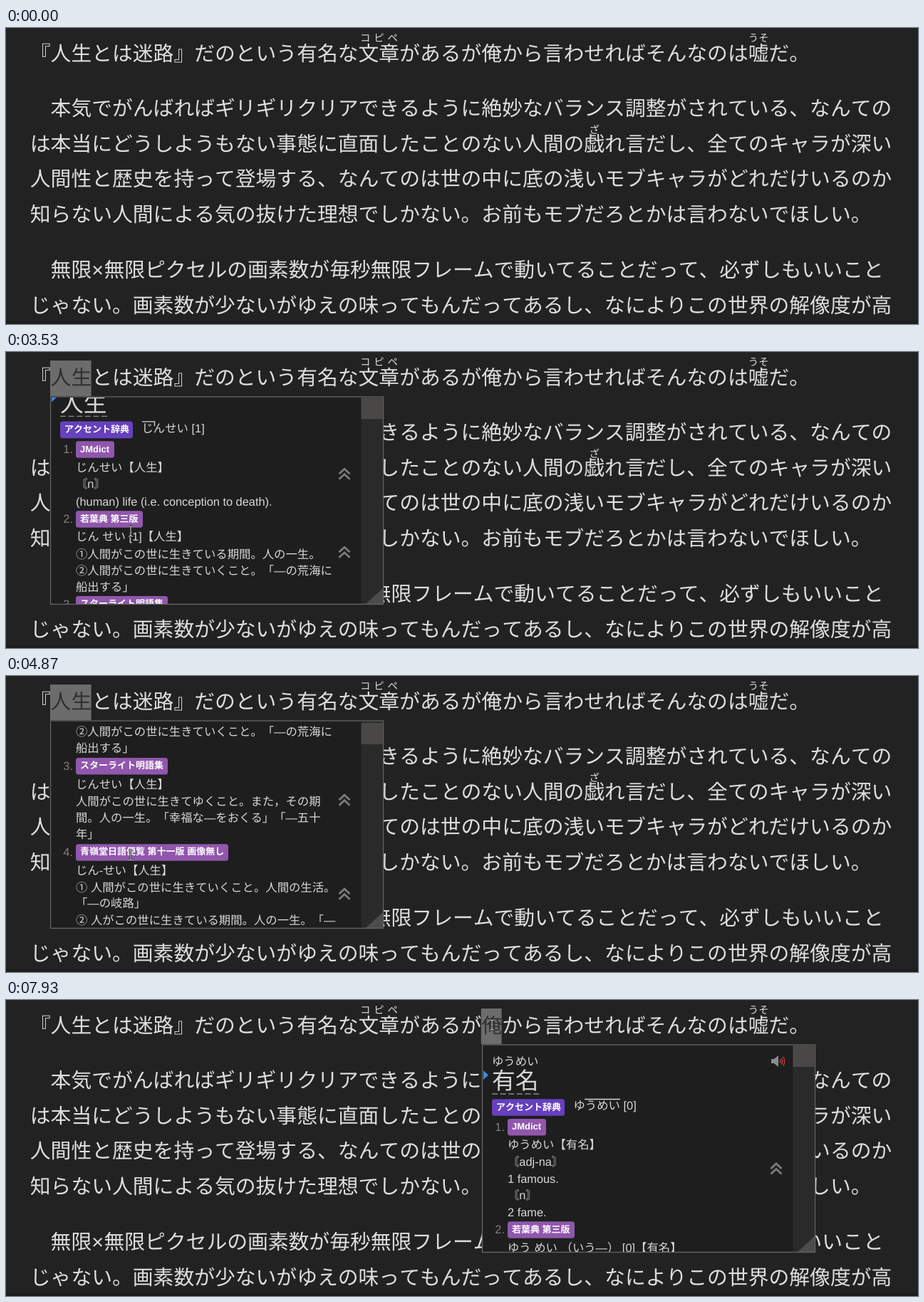
An HTML page for the animation above (8 s loop, 1280 by 416 pixels).

```html
<!DOCTYPE html>
<html lang="ja">
<head>
<meta charset="utf-8">
<title>Pop-up dictionary</title>
<style>
html, body { margin: 0; width: 100%; height: 100%; overflow: hidden; background: #222; }
svg { display: block; width: 1280px; height: 416px; }
text {
  white-space: pre;
  text-spacing-trim: space-all;
  text-rendering: geometricPrecision;
  font-kerning: none;
  font-feature-settings: "kern" 0, "palt" 0, "chws" 0;
}
.page { font-family: "Noto Sans CJK JP", "Noto Sans CJK", sans-serif; fill: #dedede; }
.dict { font-family: "Liberation Sans", "Noto Sans CJK JP", "Noto Sans CJK", sans-serif; fill: #d8d8d8; }
.dict .num { fill: #808080; }
.dict .tag { fill: #fff; font-weight: bold; }
.mark { fill: #303030; }
</style>
</head>
<body>
<svg id="stage" viewBox="0 0 1280 416">
  <defs><clipPath id="inner"><rect x="63" y="64" width="435.5" height="290"/></clipPath></defs>
</svg>
<script>
const stage = document.getElementById('stage');
const EM = 28.8, LEFT = 33.8, SMALL = 16.38;

function el(parent, tag, attrs = {}) {
  const node = document.createElementNS('http://www.w3.org/2000/svg', tag);
  for (const key in attrs) node.setAttribute(key, attrs[key]);
  parent.appendChild(node);
  return node;
}

// y is the middle of the ideographic box
function write(parent, x, y, size, str, attrs = {}) {
  const node = el(parent, 'text', { x, y: y + size * 0.38, 'font-size': size, ...attrs });
  node.textContent = str;
  return node;
}

// ---- page ----
const page = el(stage, 'g', { class: 'page' });
el(page, 'rect', { y: 412, width: 1280, height: 4, fill: '#1d1d1d' });
[
  [34.7, '『人生とは迷路』だのという有名な文章があるが俺から言わせればそんなのは嘘だ。'],
  [112, '　本気でがんばればギリギリクリアできるように絶妙なバランス調整がされている、なんての'],
  [162, 'は本当にどうしようもない事態に直面したことのない人間の戯れ言だし、全てのキャラが深い'],
  [211.5, '人間性と歴史を持って登場する、なんてのは世の中に底の浅いモブキャラがどれだけいるのか'],
  [261.3, '知らない人間による気の抜けた理想でしかない。お前もモブだろとかは言わないでほしい。'],
  [339, '　無限'],
  [389, 'じゃない。画素数が少ないがゆえの味ってもんだってあるし、なによりこの世界の解像度が高']
].forEach(([y, str]) => write(page, LEFT, y, EM, str));
write(page, LEFT + 3 * EM, 339, EM, '×', { style: 'font-family:"Liberation Sans",sans-serif' });
write(page, 137.4, 339, EM, '無限ピクセルの画素数が毎秒無限フレームで動いてることだって、必ずしもいいこと');

const ruby = (col, shift, y, str, gap = 0) =>
  write(page, LEFT + col * EM + shift, y, 14.4, str, { 'letter-spacing': gap });
ruby(16, 2.4, 14, 'コピペ', 4.8);
ruby(35, 0, 14, 'うそ');
ruby(27, 7.2, 143, 'ざ');

const marks = [[1, '人生'], [13, '有名'], [22, '俺']].map(([col, word]) => {
  const g = el(stage, 'g', { class: 'page' }), x = LEFT + col * EM;
  el(g, 'rect', { x: x - 0.6, y: 12, width: word.length * EM, height: 50, fill: '#6c6c6c' });
  write(g, x, 34.7, EM, word, { class: 'mark' });
  return g;
});

// ---- popup ----
const popup = el(stage, 'g', { class: 'dict' });
el(popup, 'rect', { x: 62.5, y: 63, width: 467, height: 291.5, fill: '#1e1e1e' });
const view = el(popup, 'g', { 'clip-path': 'url(#inner)' });
el(popup, 'rect', { x: 498.5, y: 64, width: 30, height: 290, fill: '#2a2a2a' });
const thumb = el(popup, 'rect', { x: 498.5, y: 64, width: 30, height: 30, fill: '#4a4846' });
el(popup, 'path', { d: 'M529 332V354H505Z', fill: '#4c4c4c' });
el(popup, 'rect', { x: 62.5, y: 63, width: 467, height: 291.5, fill: 'none', stroke: '#646464', 'stroke-width': 1.3 });

function tag(g, x, y, width, str, fill) {
  el(g, 'rect', { x, y: y - 11.8, width, height: 23.6, rx: 3.5, fill });
  write(g, x + 6, y - 1.4, 13, str, { class: 'tag' });
}

function entry({ kana, word, accent, pitch, tags, lines, arrows }) {
  const g = el(view, 'g');
  write(g, 76, 86, SMALL, kana);
  write(g, 76, 113, SMALL * 2, word);
  el(g, 'path', { d: 'M76 132H142', stroke: '#8a8a8a', 'stroke-width': 1.4, 'stroke-dasharray': '8 3.6' });
  el(g, 'path', { d: 'M64 99L71 105.5L64 112Z', fill: '#3f8ae0' });
  el(g, 'path', { d: 'M468 83H472L478 78V94L472 89H468Z', fill: '#8c8c8c' });
  el(g, 'path', { d: 'M480 83.5Q482 86 480 88.5M482.3 81.5Q485 86 482.3 90.5M484.8 79.5Q488.5 86 484.8 92.5',
    fill: 'none', stroke: '#c93a3a', 'stroke-width': 1.4 });
  tag(g, 76, 151, 102, 'アクセント辞典', '#6640be');
  write(g, 190.5, 148, SMALL, kana + accent);
  el(g, 'path', { d: pitch, fill: 'none', stroke: '#d8d8d8', 'stroke-width': 1.4 });
  tags.forEach(([y, width, str], i) => {
    write(g, 94, y - 1, SMALL, i + 1 + '.', { class: 'num', 'text-anchor': 'end' });
    tag(g, 98, y, width, str, '#9057ad');
  });
  lines.forEach(([y, str]) => write(g, 98, y, SMALL, str));
  arrows.forEach(y => el(g, 'path', {
    d: `M467.5 ${y}l7.5 -7l7.5 7m-15 7.5l7.5 -7l7.5 7`,
    fill: 'none', stroke: '#7c7c7c', 'stroke-width': 2.8
  }));
  return g;
}

const life = entry({
  kana: 'じんせい', word: '人生', accent: ' [1]', pitch: 'M191 139.5H208.5V146',
  tags: [
    [178.7, 54, 'JMdict'],
    [276.7, 94, '若葉典 第三版'],
    [396.5, 129, 'スターライト明語集'],
    [517.7, 214, '青嶺堂日語便覧 第十一版 画像無し'],
    [662, 159, '青嶺堂日語便覧 第十一版']
  ],
  lines: [
    [203, 'じんせい【人生】'], [226.7, '〘n〙'], [251, '(human) life (i.e. conception to death).'],
    [300.5, 'じん せい [1]【人生】'],
    [325, '①人間がこの世に生きている期間。人の一生。'],
    [348, '②人間がこの世に生きていくこと。「―の荒海に'], [371, '船出する」'],
    [422, 'じんせい【人生】'],
    [446, '人間がこの世に生きてゆくこと。また，その期'],
    [469, '間。人の一生。「幸福な―をおくる」「―五十'], [491.5, '年」'],
    [542.3, 'じん-せい【人生】'],
    [566.5, '① 人間がこの世に生きていくこと。人間の生活。'], [589, '「―の岐路」'],
    [612.5, '② 人がこの世に生きている期間。人の一生。「―'], [636, '七十古来稀（まれ）なり」']
  ],
  arrows: [213, 323, 444, 576]
});

const fame = entry({
  kana: 'ゆうめい', word: '有名', accent: ' [0]', pitch: 'M206 139.5H256',
  tags: [[178.7, 54, 'JMdict'], [323, 94, '若葉典 第三版']],
  lines: [
    [203, 'ゆうめい【有名】'], [226.7, '〘adj-na〙'], [251, '1 famous.'], [273.5, '〘n〙'],
    [298, '2 fame.'], [347.5, 'ゆう めい （いう―） [0]【有名】']
  ],
  arrows: [237]
});

// ---- pointer ----
const beam = el(stage, 'g', { fill: 'none' });
[['#111', 2.6], ['#e8e8e8', 1]].forEach(([stroke, width]) =>
  el(beam, 'path', { d: 'M-3 -7H-1L0 -6L1 -7H3M0 -6V6M-3 7H-1L0 6L1 7H3', stroke, 'stroke-width': width }));
const arrow = el(stage, 'path', {
  d: 'M0 0V15L3.5 11.8L6 17.4L8.3 16.4L5.9 11H10.6Z', fill: '#fff', stroke: '#111', 'stroke-width': 0.9
});

// ---- timeline ----
const BEAM = 0, ARROW = 1;
const moves = [
  [330, 321, 27.5, BEAM], [530, 322, 60, ARROW], [730, 318, 84, ARROW], [1000, 200, 72, ARROW],
  [1070, 165, 52, BEAM], [1200, 100, 40, BEAM], [1330, 51, 38, BEAM], [1500, 75, 36, BEAM],
  [2070, 75, 36, BEAM], [2270, 92, 72, ARROW], [2720, 179, 230, ARROW], [2930, 168, 239, ARROW],
  [3070, 150, 240, ARROW], [3200, 175, 252, BEAM], [5130, 175, 252, BEAM], [5270, 215, 215, ARROW],
  [5600, 405, 62, BEAM], [5720, 421, 37, BEAM], [6000, 421, 37, BEAM], [6150, 432, 75, ARROW],
  [6530, 474, 213, ARROW], [6660, 476, 238, ARROW], [6800, 477, 232, ARROW], [6930, 477, 232, ARROW],
  [7370, 640, 66, BEAM], [7530, 698, 36, BEAM], [7670, 682, 35, BEAM]
];
const scrolls = [
  [3400, 0], [3800, 125], [4067, 216], [4200, 216], [4333, 237], [4533, 259], [4800, 259], [5067, 302]
];

// values between two keys; the time itself is left out
function at(keys, t) {
  const i = keys.findIndex(k => k[0] > t);
  if (i === 0) return keys[0].slice(1);
  if (i < 0) return keys[keys.length - 1].slice(1);
  const a = keys[i - 1], b = keys[i], p = (t - a[0]) / (b[0] - a[0]);
  return a.slice(1).map((v, j) => v + (b[j + 1] - v) * p);
}

const phase = (t, times) => times.filter(s => t >= s).length - 1;
const show = (node, on) => node.setAttribute('visibility', on ? 'visible' : 'hidden');
const place = (node, x, y) => node.setAttribute('transform', `translate(${x} ${y})`);

function draw(t) {
  const mark = phase(t, [1660, 5860, 7860]);
  marks.forEach((g, i) => show(g, i === mark));

  const spot = phase(t, [1730, 5930, 7930]);
  const swapped = t >= 6060;
  const scroll = swapped ? 0 : at(scrolls, t)[0];
  popup.style.display = spot < 0 ? 'none' : '';
  if (spot >= 0) place(popup, [0, 346, 606][spot], 0);
  show(life, !swapped);
  show(fame, swapped);
  place(life, 0, -scroll);
  thumb.setAttribute('y', 64 + scroll / 150);

  const [x, y] = at(moves, t);
  const last = moves.filter(m => m[0] <= t).pop();
  const kind = last ? last[3] : BEAM;
  show(beam, t >= 130 && kind === BEAM);
  show(arrow, t >= 130 && kind === ARROW);
  place(beam, x, y);
  place(arrow, x, y);
}

const STEP = 1000 / 15, start = performance.now();
function tick(now) {
  const t = Math.max(0, now - start) % 8000;
  draw(Math.floor((t + 3.4) / STEP) % 120 * STEP);
  requestAnimationFrame(tick);
}
draw(0);
requestAnimationFrame(tick);
</script>
</body>
</html>
```
